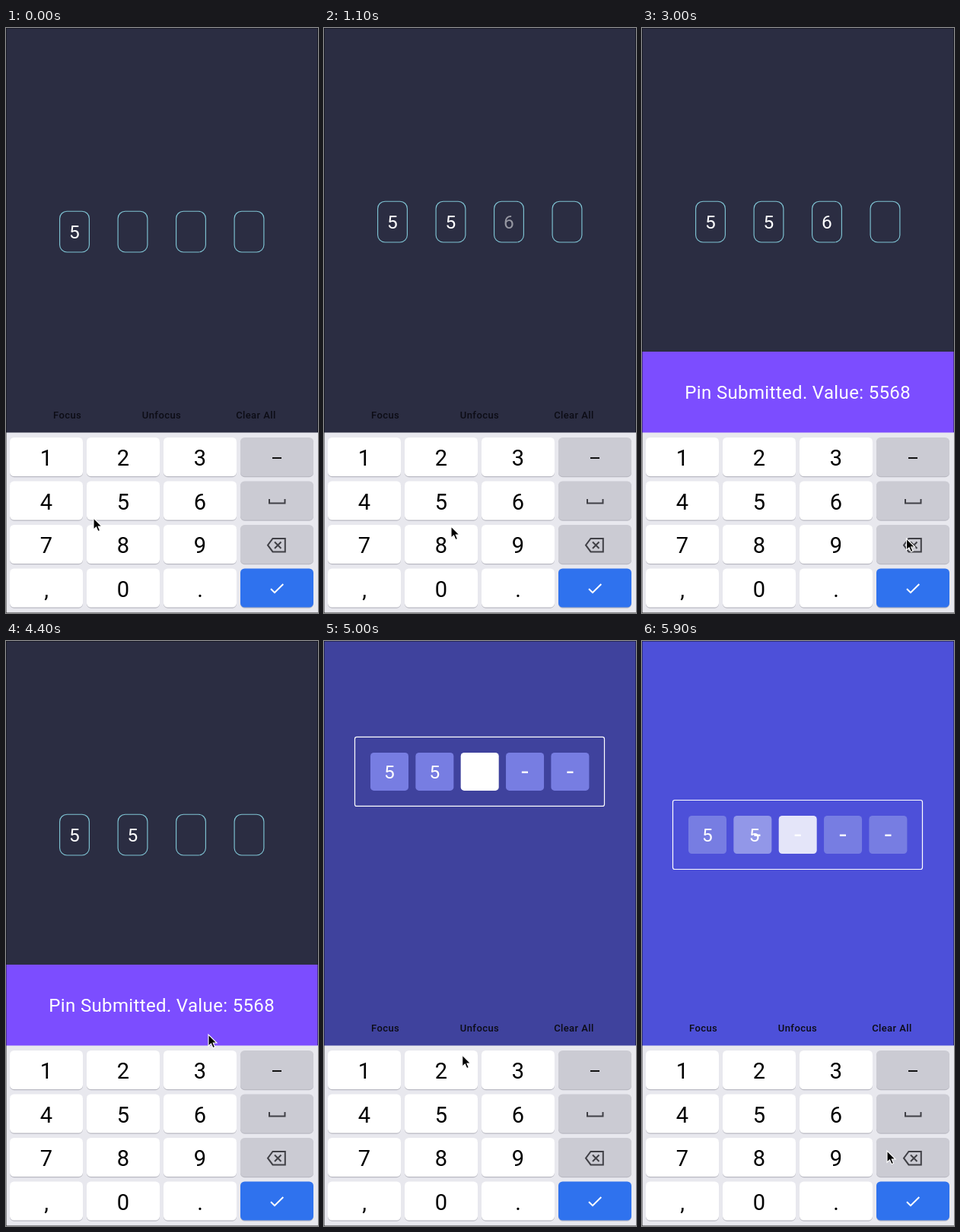
An HTML page that plays this animation: 410x770 px, repeating every 6000 ms.

```html
<!DOCTYPE html>
<html lang="en">
<head>
<meta charset="utf-8">
<title>Pin entry</title>
<style>
  html, body { margin: 0; width: 100%; height: 100%; overflow: hidden; background: #2b2d42; }
  svg { display: block; width: 410px; height: 770px; font-family: Roboto, sans-serif; }
  text { text-anchor: middle; }
  .digit { font-size: 24.5px; fill: #fff; }
  .dash { font-size: 34px; fill: #fff; }
  .key { font-size: 29px; fill: #000; }
  .action { font-size: 13px; font-weight: 500; letter-spacing: .4px; fill: #0c0c15; }
  .toast { font-size: 24px; letter-spacing: .35px; fill: #fff; }
  .icon { fill: none; stroke: #404046; stroke-width: 2; }
</style>
</head>
<body>
<svg viewBox="0 0 410 770">
  <defs><clipPath id="view"><rect width="410" height="510"/></clipPath></defs>
  <rect id="bg" width="410" height="770"/>
  <g clip-path="url(#view)">
    <g id="outlined"></g>
    <g id="filled">
      <rect x="40.5" y="-45.5" width="328" height="91" rx="2.5" fill="none" stroke="#fff" stroke-width="1.2"/>
    </g>
  </g>
  <g id="actions"></g>
  <g id="toast">
    <rect y="426" width="410" height="110" fill="#7c4dff"/>
    <text class="toast" x="204.7" y="488">Pin Submitted. Value: 5568</text>
  </g>
  <g id="board"><rect y="532.5" width="410" height="237.5" fill="#e8e8ee"/></g>
  <path d="M.5 0V770M0 .5H410M409.5 0V532M0 769.5H410" stroke="#000" stroke-opacity=".4"/>
  <path id="cursor" d="M0 0V15.2L3.5 12 6 17.6 8.6 16.5 6.2 11H11Z" stroke="#fff" stroke-width="1.1"/>
</svg>
<script>
const LOOP = 6000, STEP = 100, VIEW = 510, FADE = 220, ERASE = 5900;
const DARK = [43, 45, 66], BLUE = [77, 80, 217], CELL = [119, 125, 226], WHITE = [255, 255, 255];
const $ = id => document.getElementById(id);

function add(parent, tag, attrs, text) {
  const el = document.createElementNS('http://www.w3.org/2000/svg', tag);
  for (const k in attrs) el.setAttribute(k, attrs[k]);
  if (text) el.textContent = text;
  return parent.appendChild(el);
}
const ramp = (t, from, to) => Math.min(1, Math.max(0, (t - from) / (to - from)));
const easeOut = p => p * (2 - p);
const lerp = (a, b, k) => a + (b - a) * k;
const mix = (a, b, k) => `rgb(${a.map((v, i) => Math.round(lerp(v, b[i], k)))})`;
const shift = (el, x, y) => el.setAttribute('transform', `translate(${x} ${y})`);

// First page: outlined cells, each digit with the times it is typed and erased
const digits = [
  { char: '5', typed: -FADE },
  { char: '5', typed: 400 },
  { char: '6', typed: 1000, erased: 3600 },
  { char: '8', typed: 1400, erased: 2800 }
].map((d, i) => {
  const x = 90 + i * 76.5;
  add($('outlined'), 'rect', { x: x - 19.4, y: -26.8, width: 38.8, height: 53.8, rx: 9.5,
    fill: 'none', stroke: '#7fc4d4', 'stroke-width': 1.15 });
  return { erased: LOOP, ...d, text: add($('outlined'), 'text', { class: 'digit', x, y: 8.8 }, d.char) };
});

// Second page: filled cells
const cells = [...'55---'].map((c, i) => {
  const x = 86 + i * 59.35;
  const box = add($('filled'), 'rect', { x: x - 25, y: -25, width: 50, height: 50, rx: 4.5 });
  const text = add($('filled'), 'text', c === '5'
    ? { class: 'digit', x, y: 8.8 } : { class: 'dash', x, y: 11 }, c);
  return { x, box, text };
});
const nextDash = add($('filled'), 'text', { class: 'dash', x: 151.5, y: 11 }, '-');

['Focus', 'Unfocus', 'Clear All'].forEach((s, i) =>
  add($('actions'), 'text', { class: 'action', x: 80.6 + i * 123.9, y: 514 }, s));

// Keyboard
const keys = {};
['123-', '456_', '789<', ',0.>'].forEach((row, r) => [...row].forEach((c, i) => {
  const x = 5 + i * 101, y = 539 + r * 57.5;
  const fill = c === '>' ? '#2f72ee' : i === 3 ? '#cbcbd3' : '#fff';
  const box = { x, y, width: 96, height: 51, rx: 5.5 };
  add($('board'), 'rect', { ...box, y: y + 1.2, fill: '#b9b9c2' });
  keys[c] = add($('board'), 'rect', { ...box, fill });
  if (i < 3) add($('board'), 'text', { class: 'key', x: x + 48, y: y + 37.3 }, c);
}));
const icon = (d, stroke) => add($('board'), 'path', { class: 'icon', d, style: stroke && `stroke:${stroke}` });
icon('M350 566H362', '#111');
icon('M346 620V625.6H366.5V620');
icon('M350.5 672H366.8V689.4H350.5L344 680.7ZM353 676.5L361.5 685M361.5 676.5L353 685');
icon('M348 738.3L353 743.2L364.3 732', '#fff');

// Cursor waypoints: time, x, y
const path = [
  [0, 115, 645], [300, 150, 633], [950, 236, 627], [1100, 167, 656], [1400, 150, 677],
  [2500, 347.5, 672], [4200, 347.5, 672], [4400, 266, 518], [4700, 222, 130],
  [4900, 205, 457], [5100, 158.5, 633], [5750, 322, 671]
];
function cursorAt(t) {
  const i = path.findLastIndex(p => p[0] <= t);
  const a = path[i], b = path[i + 1] || a;
  const k = a === b ? 0 : ramp(t, a[0], b[0]);
  return [lerp(a[1], b[1], k), lerp(a[2], b[2], k)];
}

function draw(t) {
  const y = 268 - 13 * easeOut(ramp(t, 0, 300));
  const pull = VIEW * easeOut(ramp(t, 4675, 5220));
  const toast = easeOut(ramp(t, 1500, 1800)) - easeOut(ramp(t, 4650, 4930));
  shift($('outlined'), 0, y + pull);
  shift($('filled'), 0, y + pull - VIEW);
  shift($('toast'), 0, 107 * (1 - toast));
  shift($('cursor'), ...cursorAt(t));
  $('bg').setAttribute('fill', mix(DARK, BLUE, ramp(t, 4865, 5090)));

  const held = digits.find(d => t >= d.typed - 100 && t < d.typed + 100 && d.typed > 0);
  for (const k of '568') keys[k].setAttribute('fill', held && held.char === k ? '#d6d6dc' : '#fff');
  for (const { text, typed, erased } of digits)
    text.setAttribute('opacity', ramp(t, typed, typed + FADE * .9) * (1 - ramp(t, erased, erased + FADE * .9)));

  // Backspace on the second page moves the highlight one cell back
  const back = t >= ERASE ? .2 : 0;
  cells.forEach(({ box }, i) =>
    box.setAttribute('fill', mix(CELL, WHITE, i === 2 ? 1 - back : i === 1 ? back : 0)));
  cells[1].text.setAttribute('x', cells[1].x + back * 12);
  nextDash.setAttribute('opacity', back ? 1 : 0);
}

const start = performance.now();
function tick() {
  const t = (performance.now() - start) % LOOP;
  draw(Math.floor(t / STEP) * STEP);
  requestAnimationFrame(tick);
}
tick();
</script>
</body>
</html>
```
